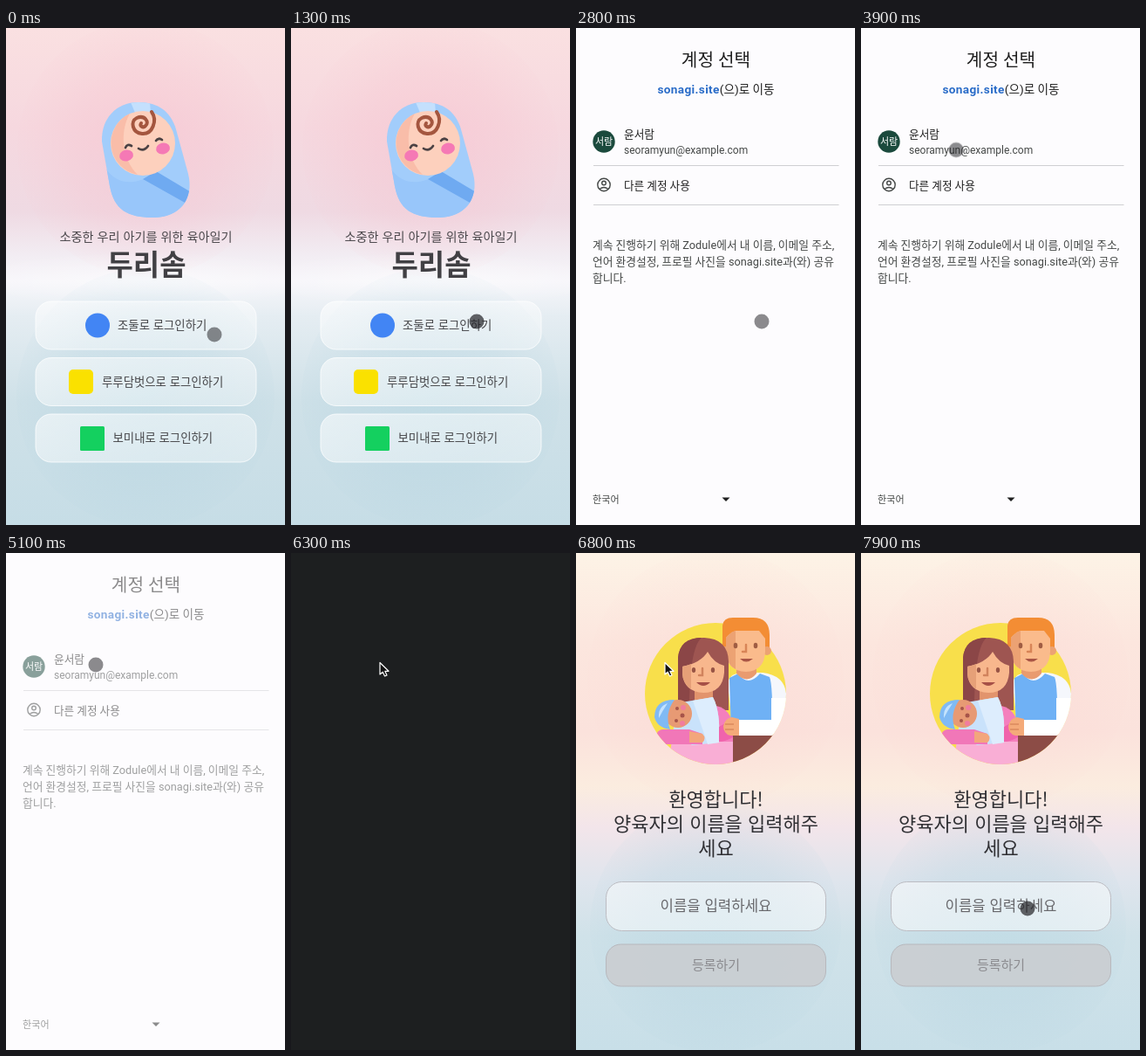
An HTML page that plays this animation: 320 by 569 pixels, repeating every 8000 ms.

```html
<!DOCTYPE html>
<html lang="ko">
<head>
<meta charset="utf-8">
<title>육아일기 로그인</title>
<style>
html, body { margin: 0; width: 100%; height: 100%; overflow: hidden; background: #fdfcfe; }
svg { display: block; width: 100vw; height: 100vh; }
text { font-family: "Noto Sans CJK KR", "Noto Sans CJK", sans-serif; }
.account text { font-family: Roboto, "Noto Sans CJK KR", "Noto Sans CJK", sans-serif; fill: #444746; }
.account .strong { fill: #1f1f1f; }
.account .link { fill: #2a6cc8; font-weight: 700; }
.mid { text-anchor: middle; }
.medium { font-weight: 500; }

.login, .account, .dark, .welcome, .arrow { animation: 8s step-end infinite; opacity: 0; }
.login { animation-name: login; }
.account { animation-name: account; }
.dark { animation-name: dark; }
.welcome { animation-name: welcome; }
.arrow { animation-name: arrow; }
.content { animation: dim 8s linear infinite; }
.pointer { animation: move 8s ease-in-out infinite; }
.dot { fill: #222226; animation: press 8s step-end infinite; }

@keyframes login { 0% { opacity: 1; } 27.5%, 100% { opacity: 0; } }
@keyframes account { 0% { opacity: 0; } 27.5% { opacity: 1; } 77.5%, 100% { opacity: 0; } }
@keyframes dark { 0% { opacity: 0; } 77.5% { opacity: 1; } 83.75%, 100% { opacity: 0; } }
@keyframes welcome { 0% { opacity: 0; } 83.75%, 100% { opacity: 1; } }
@keyframes arrow { 0% { opacity: 0; } 77.5% { opacity: 1; } 87.5%, 100% { opacity: 0; } }
@keyframes dim {
  0%, 53.75% { opacity: 1; }
  57.5%, 60% { opacity: .55; }
  63.75%, 100% { opacity: .51; }
}
@keyframes move {
  0%, 1.25% { transform: translate(239px, 351px); }
  15%, 36.25% { transform: translate(213px, 336px); }
  51.25%, 87.5% { transform: translate(103px, 128px); }
  95%, 100% { transform: translate(191px, 407px); }
}
@keyframes press {
  0% { opacity: .52; }
  16.25% { opacity: .7; }
  18.75% { opacity: .52; }
  77.5% { opacity: 0; }
  87.5% { opacity: .52; }
  96.25%, 100% { opacity: .7; }
}
</style>
</head>
<body>
<svg viewBox="0 0 320 569" preserveAspectRatio="none">
  <defs>
    <linearGradient id="rose" x2="0" y2="1">
      <stop offset="0" stop-color="#fae0e1"/>
      <stop offset=".2" stop-color="#f6d8df"/>
      <stop offset=".37" stop-color="#efdae3"/>
      <stop offset=".46" stop-color="#f2edf3"/>
      <stop offset=".51" stop-color="#f7f6fa"/>
      <stop offset=".58" stop-color="#e5edf2"/>
      <stop offset=".75" stop-color="#cfe1e8"/>
      <stop offset="1" stop-color="#c6dde6"/>
    </linearGradient>
    <linearGradient id="cream" x2="0" y2="1">
      <stop offset="0" stop-color="#fdf3e6"/>
      <stop offset=".18" stop-color="#fce6de"/>
      <stop offset=".36" stop-color="#fbe2dc"/>
      <stop offset=".47" stop-color="#fbecdf"/>
      <stop offset=".55" stop-color="#f3e5ea"/>
      <stop offset=".66" stop-color="#dfe5ed"/>
      <stop offset=".77" stop-color="#d0e2e9"/>
      <stop offset="1" stop-color="#c8dfe8"/>
    </linearGradient>
    <radialGradient id="pink">
      <stop offset="0" stop-color="#f7bccb" stop-opacity=".5"/>
      <stop offset=".6" stop-color="#f7c2ce" stop-opacity=".3"/>
      <stop offset="1" stop-color="#f7c8d2" stop-opacity=".06"/>
    </radialGradient>
    <radialGradient id="blue">
      <stop offset="0" stop-color="#b3d6e2" stop-opacity=".45"/>
      <stop offset=".6" stop-color="#b3d3e0" stop-opacity=".3"/>
      <stop offset="1" stop-color="#b3d3e0" stop-opacity=".08"/>
    </radialGradient>
    <radialGradient id="peach">
      <stop offset="0" stop-color="#fbd3d0" stop-opacity=".4"/>
      <stop offset="1" stop-color="#fbd3d0" stop-opacity=".05"/>
    </radialGradient>
    <linearGradient id="glass" x2="1" y2="1">
      <stop offset="0" stop-color="#fff" stop-opacity=".55"/>
      <stop offset="1" stop-color="#fff" stop-opacity=".36"/>
    </linearGradient>
    <radialGradient id="band">
      <stop offset="0" stop-color="#fff" stop-opacity=".45"/>
      <stop offset="1" stop-color="#fff" stop-opacity="0"/>
    </radialGradient>
    <clipPath id="swaddle"><use href="#bundle"/></clipPath>
    <clipPath id="disc"><path d="M60 60H260V161H241A81 81 0 0 1 79 161H60Z"/></clipPath>
    <rect id="button" x="34" width="253" height="55" rx="18" fill="url(#glass)" stroke="#fff" stroke-opacity=".75"/>
  </defs>

  <g class="login">
    <rect width="320" height="569" fill="url(#rose)"/>
    <circle cx="160" cy="138" r="147" fill="url(#pink)"/>
    <circle cx="160" cy="423" r="148" fill="url(#blue)"/>
    <ellipse cx="160" cy="288" rx="210" ry="32" fill="url(#band)"/>

    <path id="bundle" fill="#a2cdfb" d="M110 130C109 103 127 85 152 85C175 85 189 96 195 116L209 167C216 196 199 217 169 217C139 217 124 208 119 181Z"/>
    <g clip-path="url(#swaddle)">
      <path d="M114 160C127 181 149 179 166 169L214 200V220H140C120 211 114 185 114 160Z" fill="#98c6fa"/>
      <path d="M157 173L172 164L214 189L207 201Z" fill="#6faaf1"/>
      <path d="M143 85H165L166 98L148 97Z" fill="#c4e0fd"/>
    </g>
    <circle cx="157" cy="132" r="37" fill="#fdd0bd"/>
    <path d="M142 98A37 37 0 0 0 151 168C133 150 130 119 142 98Z" fill="#f9bda9"/>
    <path d="M167 96C174 106 168 122 156 121C145 120 142 107 150 103C159 99 165 108 160 112C157 115 153 112 155 109" fill="none" stroke="#a4563f" stroke-width="4" stroke-linecap="round"/>
    <g fill="#f579b5">
      <ellipse cx="138" cy="146" rx="8" ry="6.5" transform="rotate(-14 138 146)"/>
      <ellipse cx="180" cy="138" rx="8" ry="6.5" transform="rotate(-14 180 138)"/>
    </g>
    <g fill="none" stroke="#4b4244" stroke-width="2.7" stroke-linecap="round">
      <path d="M137 137Q139 132 144 135M172 129Q175 125 179 128M152 138Q158 142 163 135"/>
    </g>

    <text class="mid" x="160.5" y="243.5" font-size="14.15" fill="#4a474b">소중한 우리 아기를 위한 육아일기</text>
    <text class="mid" x="161" y="282.5" font-size="33" font-weight="700" fill="#414044">두리솜</text>

    <use href="#button" y="313"/>
    <use href="#button" y="377.5"/>
    <use href="#button" y="442"/>
    <circle cx="105" cy="340.5" r="14" fill="#4285f4"/>
    <rect x="72" y="391" width="28" height="28" rx="5" fill="#fae100"/>
    <rect x="85" y="456" width="28" height="28" rx="1.5" fill="#14d05f"/>
    <g font-size="13.4" fill="#454548">
      <text x="128" y="344.5">조둘로 로그인하기</text>
      <text x="110" y="409.5">루루담벗으로 로그인하기</text>
      <text x="122.5" y="474">보미내로 로그인하기</text>
    </g>
  </g>

  <g class="account">
    <rect width="320" height="569" fill="#fdfcfe"/>
    <g class="content">
      <text class="mid strong" x="160.5" y="44" font-size="20.2">계정 선택</text>
      <text class="mid strong" x="160.5" y="74.5" font-size="13.6"><tspan class="link" letter-spacing=".35">sonagi.site</tspan>(으)로 이동</text>
      <circle cx="32" cy="130" r="12.7" fill="#1b4a3d"/>
      <text class="mid" x="32" y="134" font-size="11" style="fill:#fff">서람</text>
      <text class="strong medium" x="55" y="126" font-size="12.7">윤서람</text>
      <text x="55" y="143.5" font-size="12">seoramyun@example.com</text>
      <path d="M20 157.5H301.500M20 202.500H301.500" stroke="#cfcfd2"/>
      <g fill="none" stroke="#444746" stroke-width="1.4">
        <circle cx="32" cy="179.500" r="7.200"/>
        <circle cx="32" cy="177.500" r="2.300"/>
        <path d="M27 184.500Q32 180.500 37 184.500"/>
      </g>
      <text class="strong medium" x="55" y="184.500" font-size="12.600">다른 계정 사용</text>
      <g font-size="12.75">
        <text x="19" y="252.500">계속 진행하기 위해 Zodule에서 내 이름, 이메일 주소,</text>
        <text x="19" y="271.500">언어 환경설정, 프로필 사진을 sonagi.site과(와) 공유</text>
        <text x="19" y="290.500">합니다.</text>
      </g>
      <text x="19" y="543.500" font-size="11.100">한국어</text>
      <path d="M167.500 537.500H176.500L172 542Z" fill="#1f1f1f"/>
    </g>
  </g>

  <rect class="dark" width="320" height="569" fill="#1d1f20"/>

  <g class="welcome">
    <rect width="320" height="569" fill="url(#cream)"/>
    <circle cx="160" cy="143" r="147" fill="url(#peach)"/>
    <circle cx="160" cy="428" r="144" fill="url(#blue)"/>

    <circle cx="160" cy="161" r="81" fill="#f8df4b"/>
    <g clip-path="url(#disc)">
      <!-- father -->
      <path d="M180 208H229V245H180Z" fill="#8c4c46"/>
      <path d="M174 149Q176 138 190 137H214Q239 140 241 161V207H180Z" fill="#f5f7fc"/>
      <path d="M176 143L186 138Q197 154 211 138L222 142Q226 151 225 207H178Z" fill="#6fb1f5"/>
      <path d="M184 126H207V138Q196 151 184 138Z" fill="#e99b6f"/>
      <path d="M168 99V83Q169 74 180 74H203Q222 74 222 94V110H168Z" fill="#f38d34"/>
      <circle cx="171" cy="112" r="5" fill="#eca273"/>
      <circle cx="219" cy="112" r="5" fill="#eca273"/>
      <path d="M172 97Q177 91 183 89H210L217 98V113Q216 135 195 136Q173 135 172 113Z" fill="#fabb8c"/>
      <path d="M172 97Q177 91 183 89V133Q172 127 172 113Z" fill="#eca273"/>
      <path d="M195 105V113H191" fill="none" stroke="#d88557" stroke-width="2.5" stroke-linecap="round"/>
      <path d="M188 121Q195 128 203 121Z" fill="#a95545"/>
      <g fill="#a05d43"><ellipse cx="183" cy="106" rx="2.300" ry="3.300"/><ellipse cx="206" cy="106" rx="2.300" ry="3.300"/></g>

      <!-- mother -->
      <path d="M117 179V120Q119 97 147 97Q174 98 175 124V180Z" fill="#9e5551"/>
      <path d="M117 179V120Q119 97 144 97Q130 109 130 179Z" fill="#8b4647"/>
      <path d="M106 245Q111 184 132 176H161Q180 181 180 206V245Z" fill="#f9aed5"/>
      <path d="M155 174Q180 176 180 203V216H158Z" fill="#f47fbd"/>
      <path d="M136 154H157V171Q146 184 136 171Z" fill="#e2946d"/>
      <path d="M122 130Q143 126 151 113Q158 126 170 129V137Q168 160 146 160Q124 159 122 138Z" fill="#f8b78d"/>
      <path d="M122 130Q128 129 132 127V156Q122 149 122 138Z" fill="#e6a078"/>
      <path d="M145 132V140H141" fill="none" stroke="#d1835d" stroke-width="2.500" stroke-linecap="round"/>
      <path d="M138 148Q146 156 154 148Z" fill="#a65047"/>
      <g fill="#985445"><ellipse cx="135" cy="134" rx="2.200" ry="3"/><ellipse cx="157" cy="134" rx="2.200" ry="3"/></g>

      <!-- baby -->
      <path d="M121 171L157 165Q166 182 164 217L133 220L111 204Z" fill="#c9e2fb"/>
      <path d="M134 169L157 165Q166 182 164 217L151 219Z" fill="#ddedfd"/>
      <circle cx="117" cy="184" r="16" fill="#e79a74"/>
      <path d="M113 168Q90 168 90 188Q93 200 108 202Q101 184 113 168Z" fill="#80baf4"/>
      <path d="M105 172Q94 176 95 189Q99 181 105 172Z" fill="#c4e3fd"/>
      <g fill="#a65449"><circle cx="116" cy="178" r="2"/><circle cx="115" cy="192" r="2"/><circle cx="122" cy="186" r="2.500"/></g>
      <g fill="#f17c9f"><circle cx="123" cy="177" r="3"/><circle cx="122" cy="195" r="3"/></g>
      <path d="M99 202H130L145 207V219H100Q92 217 92 209Q93 203 99 202Z" fill="#f177b8"/>
      <path d="M130 204L145 207Q150 212 145 217H130Z" fill="#f3a67c"/>
      <path d="M164 199L180 190V211Q171 216 164 216Z" fill="#f063ac"/>

      <path d="M184 191H224V166H241V199Q240 209 228 209H184Z" fill="#fff"/>
      <path d="M187 190V209H177Q169 207 169 198Q171 189 179 188Z" fill="#f4aa79"/>
      <path d="M171 196H181M171 202H181" stroke="#db895e" stroke-width="1.300"/>
    </g>

    <g class="mid" font-size="22" fill="#303034">
      <text x="160.500" y="290">환영합니다!</text>
      <text x="160.500" y="318">양육자의 이름을 입력해주</text>
      <text x="160.500" y="346">세요</text>
    </g>
    <rect x="34.500" y="376.500" width="252" height="56" rx="18" fill="#fff" fill-opacity=".5" stroke="#bcbcc2"/>
    <text class="mid" x="160.500" y="409.500" font-size="16.750" fill="#68686c">이름을 입력하세요</text>
    <rect x="34.500" y="448" width="252" height="48" rx="17" fill="#cbcdd0" fill-opacity=".85" stroke="#b7b8bd"/>
    <text class="mid" x="160.500" y="476.500" font-size="15" fill="#8b8b8f">등록하기</text>
  </g>

  <g class="pointer">
    <circle class="dot" r="8.500"/>
    <path class="arrow" d="M-1 -2.500V11L2.200 8.200L4.500 13L7 11.900L4.800 7.300H9Z" fill="#111" stroke="#fff" stroke-width="1.200" stroke-linejoin="round"/>
  </g>
</svg>
</body>
</html>
```
